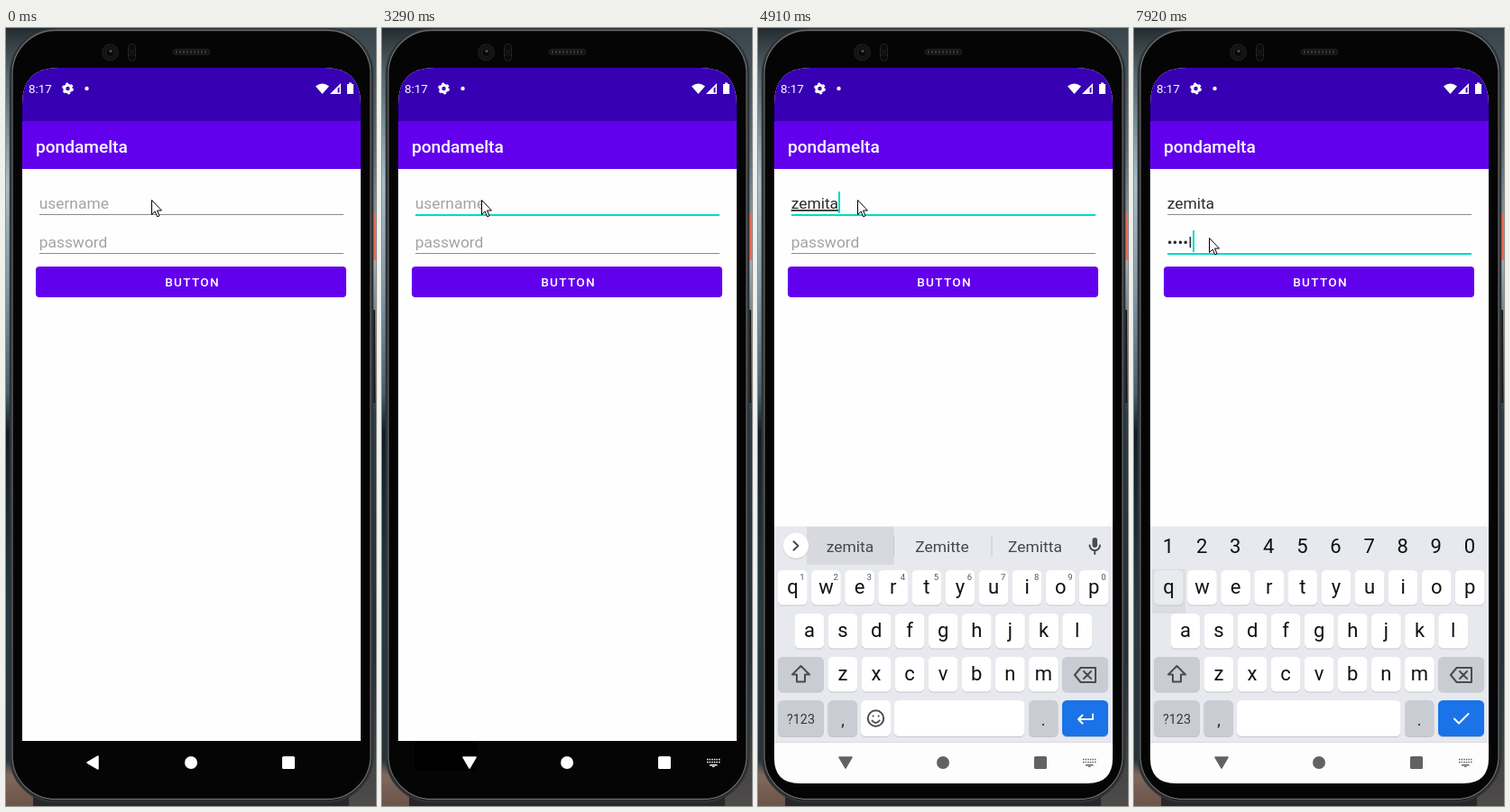
An HTML page that plays this animation: 410x861 px, repeating every 8 s.

```html
<!DOCTYPE html>
<html lang="en">
<head>
<meta charset="utf-8">
<title>Login demo</title>
<style>
  html, body { margin: 0; width: 100%; height: 100%; overflow: hidden; background: #111; }
  svg { display: block; width: 410px; height: 861px; font-family: Roboto, sans-serif; }
  .mid { text-anchor: middle; }
  .field { font-size: 17.4px; }
  .key { font-size: 22px; fill: #111; }
  .line { fill: none; stroke: #4a4c50; stroke-width: 2; stroke-linejoin: round; stroke-linecap: round; }
  .composing { text-decoration: underline; }
</style>
</head>
<body>
<svg viewBox="0 0 410 861">
  <defs>
    <linearGradient id="left" x2="0" y2="1">
      <stop offset="0" stop-color="#252c30"/><stop offset=".06" stop-color="#56666e"/>
      <stop offset=".2" stop-color="#a9bcc5"/><stop offset=".34" stop-color="#7f98a5"/>
      <stop offset=".47" stop-color="#47606c"/><stop offset=".52" stop-color="#101c23"/>
      <stop offset=".75" stop-color="#233b46"/><stop offset=".94" stop-color="#26343a"/>
      <stop offset=".96" stop-color="#80685e"/><stop offset="1" stop-color="#6d5348"/>
    </linearGradient>
    <linearGradient id="right" x2="0" y2="1">
      <stop offset="0" stop-color="#3a454b"/><stop offset=".15" stop-color="#596a73"/>
      <stop offset=".3" stop-color="#9aabb3"/><stop offset=".5" stop-color="#2b3d46"/>
      <stop offset=".8" stop-color="#1c3038"/><stop offset="1" stop-color="#4f4b49"/>
    </linearGradient>
    <clipPath id="screen">
      <path d="M18 84Q18 44 58 44H353Q393 44 393 84V808Q393 836 365 836H46Q18 836 18 808Z"/>
    </clipPath>
  </defs>

  <path fill="url(#left)" d="M0 0H205V861H0Z"/>
  <path fill="url(#right)" d="M205 0H410V861H205Z"/>
  <path fill="#25282a" d="M30 850H380V861H30Z"/>
  <path fill="#ee6a50" d="M405 205h5v52h-5z"/>
  <path fill="#1a1c1d" d="M405 312h4v103h-4z"/>
  <rect x="5" y="1" width="401" height="855" rx="50" fill="#050505" stroke="#303335" stroke-width="2.500"/>
  <rect x="7" y="2.500" width="397" height="851" rx="48" fill="#050505" stroke="#6b6e70" stroke-width="1.300"/>
  <g fill="#121212" stroke="#222">
    <circle cx="115.500" cy="27" r="9"/>
    <circle cx="115.500" cy="27" r="5" fill="#0a0a0a"/>
    <rect x="135.500" y="17.500" width="8" height="19" rx="4" fill="#0a0a0a"/>
    <path d="M136 23l7 8m0-8l-7 8"/>
    <rect x="185" y="23.500" width="41" height="6" rx="3"/>
    <path d="M188 26.500H224" stroke="#383838" stroke-width="3" stroke-dasharray="2 2"/>
  </g>
  <circle cx="116" cy="25.500" r="1.500" fill="#555"/>

  <g clip-path="url(#screen)">
    <path fill="#fefefe" d="M18 44h375v745H18z"/>
    <path fill="#3700b3" d="M18 44h375v59H18z"/>
    <path fill="#6200ee" d="M18 103h375v53H18z"/>
    <path fill="#050505" d="M18 789h375v47H18z"/>
    <g fill="#fff">
      <text x="25" y="72.300" font-size="13.400">8:17</text>
      <circle cx="68.500" cy="67" r="3.700" fill="none" stroke="#fff" stroke-width="3"/>
      <circle cx="68.500" cy="67" r="5.400" fill="none" stroke="#fff" stroke-width="2" stroke-dasharray="2.800 2.850"/>
      <circle cx="89.500" cy="67" r="2.200"/>
      <path d="M343 64.500Q350.500 58.500 358 64.500L350.500 73Z"/>
      <path fill-rule="evenodd" d="M371 61V73H359ZM369.500 65V71.500H367.500V67Z"/>
      <path d="M380 60.500h3v1.500h2v11h-7v-11h2z"/>
      <text x="33" y="137.500" font-size="19.100" font-weight="500">pondamelta</text>
    </g>
    <rect x="33" y="264" width="344" height="34" rx="4" fill="#6200ee"/>
    <text class="mid" x="206.600" y="286.200" font-size="13.600" font-weight="500" letter-spacing="1.300" fill="#fff">BUTTON</text>

    <rect id="userLine" x="37" width="337"/>
    <rect id="passLine" x="37" width="337"/>
    <text id="user" class="field" x="36.700" y="200"></text>
    <text id="pass" class="field" x="36.700" y="243"></text>
    <rect id="caret" width="2" height="24" fill="#03dac5"/>

    <path id="ripple" fill="#000" d="M36 790h70v32H36z"/>
    <g id="keyboard">
      <path fill="#e8e9ee" d="M18 551.500h375V790H18z"/>
      <path fill="#fdfdfd" d="M18 791h375v45H18z"/>
      <path fill="#dcdde1" d="M18 790h375v1H18z"/>
      <g id="strip"></g>
      <g id="keys"></g>
    </g>
    <g id="nav">
      <path id="back" d="M90 813L102 806V820Z" stroke-width="1.500" stroke-linejoin="round"/>
      <circle cx="205" cy="813" r="7" stroke="none"/>
      <rect x="306" y="806" width="14" height="14" rx="1.500" stroke="none"/>
      <g id="imeIcon">
        <path d="M360 809.500h14.500m-14.500 3h14.500" fill="none" stroke-width="1.500" stroke-dasharray="1.500 1.100"/>
        <path d="M363 815h8.500v1.500h-8.500zM366 817h2.500v1h-2.500z" stroke="none"/>
      </g>
    </g>
  </g>
  <path id="pointer" d="M.5 .5V16.500L4.200 13L6.700 18.800L9 17.800L6.500 12H11.500Z" fill="#fff" stroke="#000"/>
</svg>
<script>
const LOOP = 8000, TEAL = '#03dac5', HINT = '#a3a3a3';
const $ = id => document.getElementById(id);
const show = (id, on) => $(id).style.display = on ? '' : 'none';
const text = (x, y, s, attrs = '') => `<text x="${x}" y="${y}" ${attrs}>${s}</text>`;
const line = (d, attrs = '') => `<path class="line" d="${d}" ${attrs}/>`;
const letter = (x, y, s) => text(x, y, s, 'class="key mid"');

const start = {
  x: 161, y: 190, focus: '', caret: false, hint: HINT, user: '', pass: '', composed: 0,
  ime: false, down: false, nav: '#fff', keyboard: false, strip: 'tools', secret: false
};
// Each entry lists what changes at that time in ms.
const steps = [
  [160, { x: 149 }],
  [620, { x: 142 }],
  [765, { x: 128 }],
  [910, { x: 113 }],
  [1060, { x: 99 }],
  [1200, { x: 92 }],
  [1500, { focus: 'user', caret: true, hint: '#7b7b7b' }],
  [1650, { x: 101, hint: HINT }],
  [1800, { x: 110 }],
  [2240, { caret: false }],
  [2540, { caret: true }],
  [2690, { ime: true }],
  [3140, { caret: false }],
  [3290, { down: true }],
  [3730, { user: 'z', caret: true }],
  [3880, { user: 'ze', composed: 1 }],
  [4030, { user: 'zem', composed: 2 }],
  [4180, { user: 'zemi', composed: 3, nav: '#626262' }],
  [4310, { user: 'zemit', composed: 4, keyboard: true }],
  [4460, { user: 'zemita', composed: 5 }],
  [4610, { composed: 6 }],
  [4910, { strip: 'words' }],
  [5350, { x: 107, y: 196, caret: false }],
  [5500, { x: 98, y: 212 }],
  [5650, { x: 87, y: 228 }],
  [5800, { x: 83, y: 232 }],
  [5960, { focus: 'pass', composed: 0 }],
  [6110, { strip: 'empty' }],
  [6570, { strip: 'digits', secret: true, caret: true }],
  [7040, { pass: 'd' }],
  [7190, { pass: '•e' }],
  [7480, { pass: '••n' }],
  [7630, { pass: '•••o' }],
  [7920, { pass: '••••l' }]
];

const mic = `<rect x="370.500" y="564" width="5.500" height="11" rx="2.700" fill="#4a4c50"/>` +
  line('M367.500 572.500a5.700 5.700 0 0 0 11.400 0M373.200 578.500v3.500');
const divider = x => `<path d="M${x} 562v22" stroke="#c5c7cc"/>`;
const round = chevron => `<circle cx="42" cy="573.700" r="14.300" fill="#cfd1d5"/>
  <circle cx="42" cy="572.800" r="14" fill="#fff"/>` + line(chevron, 'stroke-width="1.700"');

const strips = {
  empty: () => '',
  tools: () => round('M44.500 568.300l-5 4.700l5 4.700') +
    line('M95 577l4 4M94.500 571.500a5 5 0 1 1-10 0a5 5 0 1 1 10 0') +
    line('M139 566h13v9l-4 4.500h-9zM152 575h-4v4M142 573q3 4 6 0M142.500 569.500h.1m5 0h.1', 'stroke-width="1.700"') +
    text(198, 577.500, 'GIF', 'class="mid" font-size="13.500" font-weight="900" letter-spacing=".8" fill="#4a4c50"') +
    line('M246 566.500h13v14h-13zM249.500 566.500v3h6v-3M249 573h7m-7 3.500h5', 'stroke-width="1.700"') +
    `<circle cx="252.500" cy="565.500" r="2" fill="#4a4c50"/>` +
    divider(285.5) +
    [313.5, 319.5, 325.5].map(x => `<circle cx="${x}" cy="573" r="2" fill="#4a4c50"/>`).join('') + mic,
  words: () => '<path fill="#d7d9de" d="M54 552h96.500v42H54z"/>' +
    round('M39.500 568.300l5 4.700l-5 4.700') +
    [[102, 'zemita'], [204, 'Zemitte'], [307, 'Zemitta']]
      .map(([x, s]) => text(x, 579.5, s, 'class="mid field" fill="#45474b"')).join('') +
    divider(150.5) + divider(259) + mic,
  digits: () => [...'1234567890'].map((d, i) => letter(38 + i * 37.1, 581, d)).join('')
};

function key(x, y, w, fill = '#fff', h = 38.5) {
  const box = (dy, color) => `<rect x="${x}" y="${y + dy}" width="${w}" height="${h}" rx="5.500" fill="${color}"/>`;
  return box(1, '#c3c5ca') + box(0, fill);
}

function drawKeys(secret) {
  const grey = '#caccd3';
  let out = secret ? '<path fill="#dcdde1" d="M20 599h37v49H20z"/>' : '';
  [['qwertyuiop', 22], ['asdfghjkl', 40.5], ['zxcvbnm', 77.5]].forEach(([chars, left], row) => {
    [...chars].forEach((c, i) => {
      const x = left + i * 37.1, y = 600 + row * 48;
      out += key(x, y, 32.7, secret && c === 'q' ? '#e9eaed' : '#fff') + letter(x + 16.4, y + 25.7, c);
      if (!row && !secret) out += text(x + 27, y + 10.5, (i + 1) % 10, 'class="mid" font-size="9.500" fill="#55575b"');
    });
  });
  out += key(22, 696, 51, grey) + line('M47.500 706L57 715.500H52V723.500H43V715.500H38Z', 'stroke-width="1.800"');
  out += key(337, 696, 51, grey) +
    line('M357.500 708H374V724H357.500L351 716ZM361 712l8 8m0-8l-8 8', 'stroke-width="1.800"');
  out += key(22, 744, 51, grey, 40) + text(47.5, 769.5, '?123', 'class="mid" font-size="14.300" fill="#35373b"');
  out += key(77.5, 744, 32.5, grey, 40) + text(94, 772, ',', 'class="mid" font-size="18" fill="#222"');
  if (secret) {
    out += key(114, 744, 181.5, '#fff', 40);
  } else {
    out += key(114, 744, 33, '#fff', 40) + key(151, 744, 144.5, '#fff', 40) +
      '<circle class="line" cx="130.500" cy="764" r="8.700" stroke-width="1.700"/>' +
      line('M126.500 766.500q4 5 8 0M127.500 761.500h.1m6 0h.1');
  }
  out += key(300, 744, 32.5, grey, 40) + text(316, 772, '.', 'class="mid" font-size="18" fill="#222"');
  out += key(337, 744, 51, '#1a73e8', 40) +
    line(secret ? 'M355 764.500l5 5l10.500-10.500' : 'M371 759.500v5.500h-16m4.500-4.500l-4.500 4.500l4.500 4.500',
      'style="stroke:#fff"');
  return out;
}

function drawField(id, value, hint, s, y) {
  const active = s.focus === id, bar = $(id + 'Line');
  bar.setAttribute('y', y + 6);
  bar.setAttribute('height', active ? 2 : 1);
  bar.setAttribute('fill', active ? TEAL : '#8c8c8c');
  const n = id === 'user' ? s.composed : 0;
  $(id).innerHTML = value ? `<tspan class="composing">${value.slice(0, n)}</tspan>${value.slice(n)}` : hint;
  $(id).setAttribute('fill', value ? '#2b2b2b' : active ? s.hint : HINT);
  if (active) {
    $('caret').setAttribute('x', Math.round(37 + (value ? $(id).getComputedTextLength() : 0)));
    $('caret').setAttribute('y', y - 19);
  }
}

function draw(s) {
  $('pointer').setAttribute('transform', `translate(${s.x} ${s.y})`);
  drawField('user', s.user, 'username', s, 200);
  drawField('pass', s.pass, 'password', s, 243);
  show('caret', s.caret);
  show('ripple', s.down);
  show('keyboard', s.keyboard);
  show('imeIcon', s.ime);
  $('back').setAttribute('transform', s.down ? 'rotate(-90 96.500 812.500)' : '');
  $('nav').setAttribute('fill', s.nav);
  $('nav').setAttribute('stroke', s.nav);
  $('strip').innerHTML = strips[s.strip]();
  $('keys').innerHTML = drawKeys(s.secret);
}

let shown = -1;
function tick() {
  const t = performance.now() % LOOP;
  const past = steps.filter(([at]) => at <= t);
  if (past.length !== shown) {
    shown = past.length;
    draw(Object.assign({}, start, ...past.map(([, change]) => change)));
  }
  requestAnimationFrame(tick);
}
tick();
</script>
</body>
</html>
```
